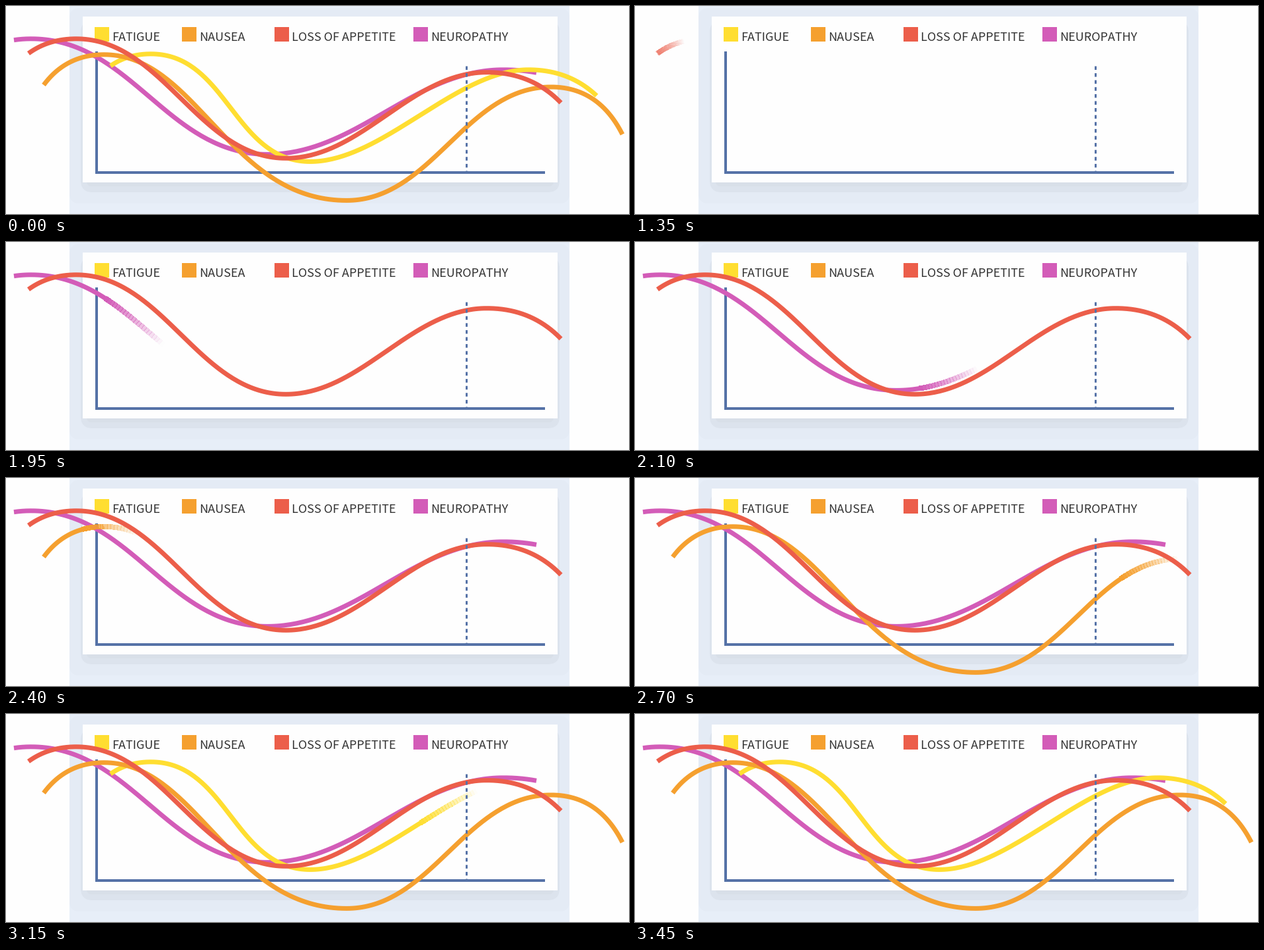
Animation, 942 px wide and 316 px high, one loop 3900 ms. Source, as a matplotlib script:

```python
import numpy as np
import matplotlib.pyplot as plt
from matplotlib.animation import FuncAnimation
from matplotlib.collections import LineCollection
from matplotlib.colors import to_rgba
from matplotlib.patches import FancyBboxPatch, Rectangle

W, H, DPI = 942, 316, 64
PT = 72 / DPI
YELLOW, ORANGE, RED, PURPLE = "#ffde31", "#f5a02f", "#ec5e4a", "#d35cb8"
BLUE, INK, PAPER = "#5572a7", "#333333", "#fefefe"
FRAMES, STEP_MS = 26, 150
CLEAR = 9                  # step at which the chart empties
FIRST, GAP = 8.86, 3.34    # start of the first sweep, steps between sweeps
SPEED = 0.355              # share of a curve drawn per step
FADE = 85                  # length of the soft leading edge

fig = plt.figure(figsize=(W / DPI, H / DPI), dpi=DPI, facecolor=PAPER)
ax = fig.add_axes([0, 0, 1, 1], xlim=(0, W), ylim=(H, 0))
ax.axis("off")


def box(x0, y0, x1, y1, color, z=1):
    ax.add_patch(Rectangle((x0, y0), x1 - x0, y1 - y0, fc=color, lw=0, zorder=z))


def soft_box(x0, y0, x1, y1, r, color):
    style = f"round,pad=0,rounding_size={r}"
    ax.add_patch(FancyBboxPatch((x0, y0), x1 - x0, y1 - y0, boxstyle=style,
                                fc=color, lw=0, zorder=1))


def bezier(p0, p1, p2, p3, n=80):
    t = np.linspace(0, 1, n)[:, None]
    p0, p1, p2, p3 = map(np.array, (p0, p1, p2, p3))
    s = 1 - t
    return s**3 * p0 + 3 * s**2 * t * p1 + 3 * s * t**2 * p2 + t**3 * p3


def slope(p, q, pull, lean=0):
    """S-bend between two level turning points; lean steepens its start."""
    dx = q[0] - p[0]
    a, b = (pull - lean) * dx, (pull + lean) * dx
    return bezier(p, (p[0] + a, p[1]), (q[0] - b, q[1]), q)


def arc(turn, end):
    """Quarter bend from a level turning point; steeper ends bend later."""
    dx, dy = end[0] - turn[0], end[1] - turn[1]
    bend = (0.5 + 0.25 * abs(dy / dx)) * dx
    knee = np.array([turn[0] + bend, turn[1]])
    p, q = np.array(turn), np.array(end)
    return bezier(p, (p + 2 * knee) / 3, (q + 2 * knee) / 3, q)


def wave(start, crest, low, crest2, end, fall, rise, lean=0):
    return np.vstack([
        arc(crest, start)[::-1],
        slope(crest, low, fall, lean)[1:],
        slope(low, crest2, rise)[1:],
        arc(crest2, end)[1:],
    ])


class Sweep:
    """A stroke revealed from left to right behind a fading edge."""

    def __init__(self, pts, color, turn, z):
        self.pts, self.begin = pts, FIRST + GAP * turn
        self.x0, self.x1 = pts[0, 0], pts[-1, 0]
        self.mid = (pts[:-1, 0] + pts[1:, 0]) / 2
        self.pairs = np.stack([pts[:-1], pts[1:]], axis=1)
        self.rgba = to_rgba(color)
        self.line, = ax.plot([], [], color=color, lw=7 * PT, zorder=z,
                             solid_capstyle="butt")
        self.edge = LineCollection([], linewidths=7 * PT, antialiaseds=False,
                                   zorder=z)
        ax.add_collection(self.edge, autolim=False)

    def show(self, i):
        head = self.x0 + (self.x1 - self.x0) * SPEED * (i - self.begin)
        if i < CLEAR:
            head = self.x1 + FADE
        alpha = np.clip((head - self.mid) / FADE, 0, 1)
        solid = np.count_nonzero(alpha == 1)
        self.line.set_data(*self.pts[:solid + 1 if solid else 0].T)

        soft = (alpha > 0) & (alpha < 1)
        colors = np.tile(self.rgba, (soft.sum(), 1))
        colors[:, 3] = alpha[soft]
        self.edge.set_segments(self.pairs[soft])
        self.edge.set_color(colors)


# Backdrop and card
box(96, 0, 852, H, "#e7eef8")
soft_box(96, 3, 852, 300, 16, "#e4ebf5")
soft_box(113, 22, 837, 283, 18, "#dce3ed")
soft_box(122, 240, 828, 274, 8, "#d8dfe8")
box(116, 16, 834, 268, PAPER)

# Legend
legend = [(134, "FATIGUE", YELLOW), (266, "NAUSEA", ORANGE),
          (406, "LOSS OF APPETITE", RED), (616, "NEUROPATHY", PURPLE)]
for x, label, color in legend:
    box(x, 32, x + 22, 54, color, 2)
    ax.text(x + 26, 53, label, family="Noto Sans CJK JP", size=18 * PT,
            color=INK, va="baseline", zorder=2)

# Axes and marker line
box(135, 69, 139, 255, BLUE, 2)
box(135, 251, 815, 255, BLUE, 2)
ax.plot([695.5, 695.5], [91, 252], color=BLUE, lw=3 * PT, zorder=10,
        ls=(0, (5.5 / 3, 5.1 / 3)), dash_capstyle="butt")

red = wave((34, 72), (106, 49.8), (423, 231.3), (727, 100.7), (839, 147),
           fall=0.416, rise=0.38)
purple = wave((12, 51.7), (38, 49.8), (395, 225.4), (752, 96.8), (802, 101.3),
              fall=0.425, rise=0.38)
orange = wave((57, 120), (148, 73.8), (515, 295.4), (824, 123), (932, 195),
              fall=0.435, rise=0.42, lean=0.05)
yellow = wave((158, 91), (219, 72.8), (460, 236.4), (790, 96.8), (893, 136.3),
              fall=0.48, rise=0.33)

curves = [Sweep(red, RED, 0, 6), Sweep(purple, PURPLE, 1, 3),
          Sweep(orange, ORANGE, 2, 5), Sweep(yellow, YELLOW, 3, 4)]


def draw(i):
    for c in curves:
        c.show(i)
    return [part for c in curves for part in (c.line, c.edge)]


anim = FuncAnimation(fig, draw, frames=FRAMES, interval=STEP_MS,
                     init_func=lambda: draw(0), repeat=True, repeat_delay=0)
plt.show()
```
